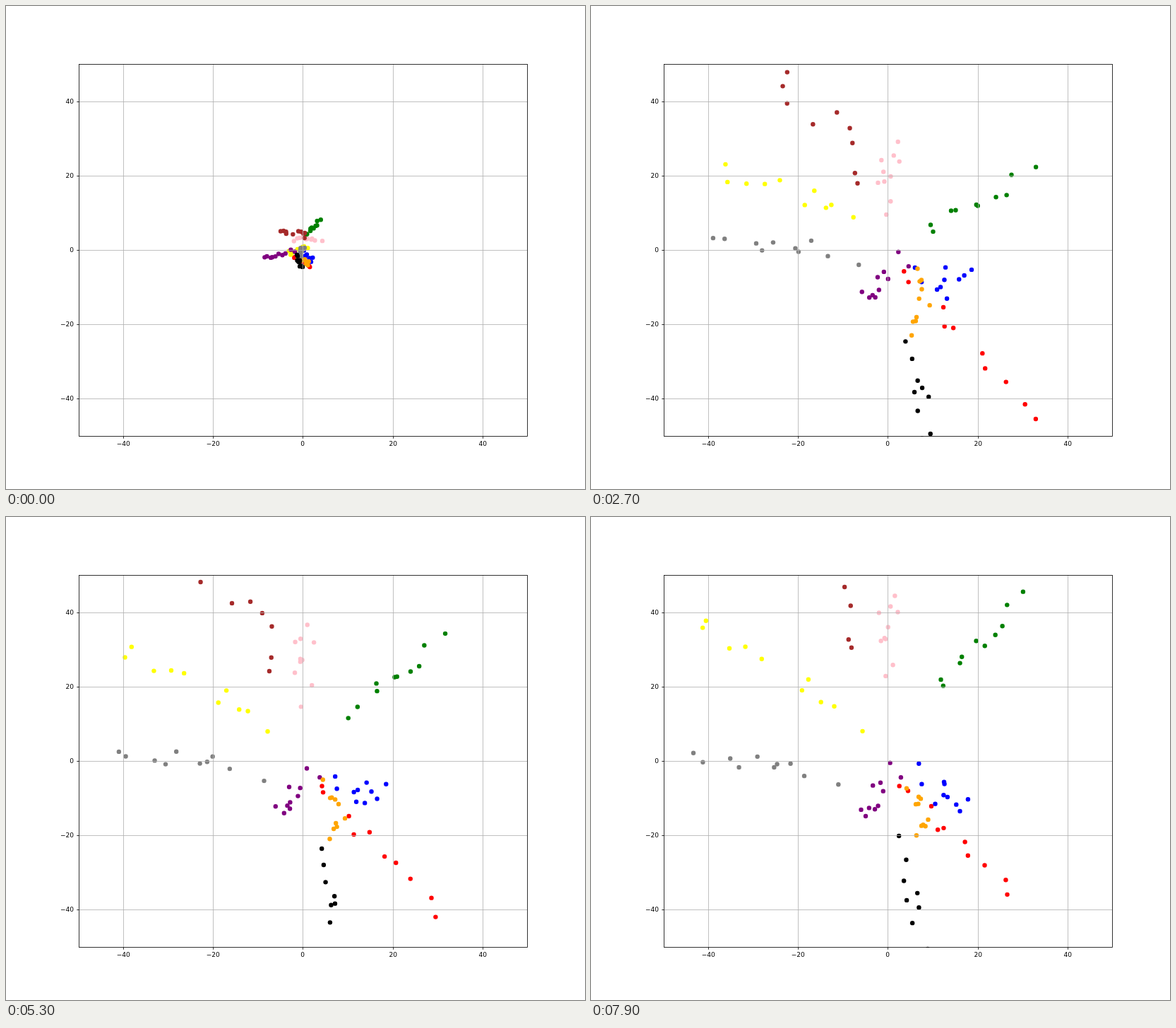
An HTML page for the animation above (8 s loop, 820 px wide and 683 px high).

```html
<!DOCTYPE html>
<html lang="en">
<head>
<meta charset="utf-8">
<title>Scatter groups</title>
<style>
  html, body { margin: 0; width: 100%; height: 100%; overflow: hidden; background: #fff; }
  svg { display: block; width: 820px; height: 683px; }
  text { font: 9.03px "DejaVu Sans", sans-serif; fill: #000; }
  path, rect { fill: none; stroke-width: 0.8; }
  .grid { stroke: #b0b0b0; }
  .axis { stroke: #000; }
</style>
</head>
<body>
<svg id="plot" viewBox="0 0 820 683">
  <clipPath id="area"><rect x="103" y="82" width="636" height="527"/></clipPath>
  <g id="dots" clip-path="url(#area)"></g>
  <g id="frame"></g>
</svg>
<script>
const LOOP = 8000, STEP = 100, SPREAD = 2100;
const DOTS = 10, DRIFT = 0.8;

const $ = id => document.getElementById(id);
function add(parent, tag, attrs, text) {
  const el = document.createElementNS('http://www.w3.org/2000/svg', tag);
  for (const k in attrs) el.setAttribute(k, attrs[k]);
  if (text) el.textContent = text;
  parent.append(el);
  return el;
}

const mix = (a, b, p) => a + (b - a) * p;
const toX = v => 420.5 + v * 6.36;
const toY = v => 345 - v * 5.26;
function noise(n) {
  const s = Math.sin(n * 127.1 + 11.7) * 43758.5453;
  return (s - Math.floor(s)) * 2 - 1;
}

// Dots scatter around a line [near x, near y, far x, far y], in plot units,
// that goes from start to spread to settled.
const groups = [];
function group(color, width, start, spread, settled) {
  const seed = groups.length * 50;
  const dots = Array.from({ length: DOTS }, (_, n) => {
    const id = seed + n * 5;
    return {
      el: add($('dots'), 'circle', { r: 3.2, fill: color }),
      along: (n + 0.4 * noise(id)) / (DOTS - 1),
      dx: width * noise(id + 1),
      dy: width * noise(id + 2),
      phase: Math.PI * noise(id + 3),
      speed: 3 + noise(id + 4)
    };
  });
  groups.push({ start, spread, settled, dots });
}

group('red',    2,   [-2, -2, 2, -4.5],   [2.5, -6, 35, -47],  [2, -6, 29, -36]);
group('blue',   4,   [-0.5, 0, 2, -3],    [8, -10, 18, -6],    [9, -4, 17, -13]);
group('green',  2.5, [1, 4, 4, 8],        [10, 3, 33, 18],     [13, 20, 31, 44]);
group('yellow', 2.5, [1, 1, -3, -1],      [-8, 9, -36, 19],    [-6, 9, -43, 38]);
group('purple', 2.5, [-2, 0, -9, -2.5],   [3, -2, -6, -15],    [1, -2, -6, -16]);
group('orange', 3.5, [-1, -2, 1.5, -4],   [6, -4, 6, -24],     [4, -6, 9, -21]);
group('pink',   2.5, [-2, 3, 3.5, 3],     [0, 9, 0, 28],       [0, 24, -1, 47]);
group('brown',  4,   [1, 4, -4.5, 5],     [-4, 18, -24, 48],   [-5, 31, -25, 70]);
group('gray',   2.5, [0, 1, -1, -2.5],    [-7, -2, -40, 4],    [-11, -4, -46, 2]);
group('black',  2.5, [-1, -1.5, -0.5, -5], [7, -27, 8, -55],   [5, -22, 7, -58]);

function drawFrame() {
  const frame = $('frame');
  const line = (cls, d) => add(frame, 'path', { class: cls, d });
  for (let v = -40; v <= 40; v += 20) {
    const x = Math.floor(toX(v) + 0.4) + 0.5;
    const y = Math.round(toY(v)) + 0.5;
    const label = String(v).replace('-', '\u2212');
    line('grid', `M${x} 82V608M103 ${y}H738`);
    line('axis', `M${x} 608.5v3.2M103.5 ${y}h-3.2`);
    add(frame, 'text', { x: x - 0.3, y: 621.6, 'text-anchor': 'middle' }, label);
    add(frame, 'text', { x: 96, y: y + 2.9, 'text-anchor': 'end' }, label);
  }
  add(frame, 'rect', { class: 'axis', x: 103.5, y: 82.5, width: 635, height: 526 });
}

function draw(t) {
  const growth = 1 - (1 - Math.min(1, t / SPREAD)) ** 2;
  const settling = Math.max(0, (t - SPREAD) / (LOOP - SPREAD));
  const scatter = mix(0.2, 1, growth);
  for (const { start, spread, settled, dots } of groups) {
    const [nx, ny, fx, fy] = start.map((v, i) =>
      mix(mix(v, spread[i], growth), settled[i], settling));
    for (const d of dots) {
      const angle = d.phase + d.speed * t / 1000;
      const x = mix(nx, fx, d.along) + scatter * (d.dx + DRIFT * Math.cos(angle));
      const y = mix(ny, fy, d.along) + scatter * (d.dy + DRIFT * Math.sin(angle));
      d.el.setAttribute('cx', toX(x));
      d.el.setAttribute('cy', toY(y));
    }
  }
}

drawFrame();
draw(0);
const begin = performance.now();
function tick() {
  const t = (performance.now() - begin) % LOOP;
  draw(Math.floor(t / STEP) * STEP);
  requestAnimationFrame(tick);
}
requestAnimationFrame(tick);
</script>
</body>
</html>
```
